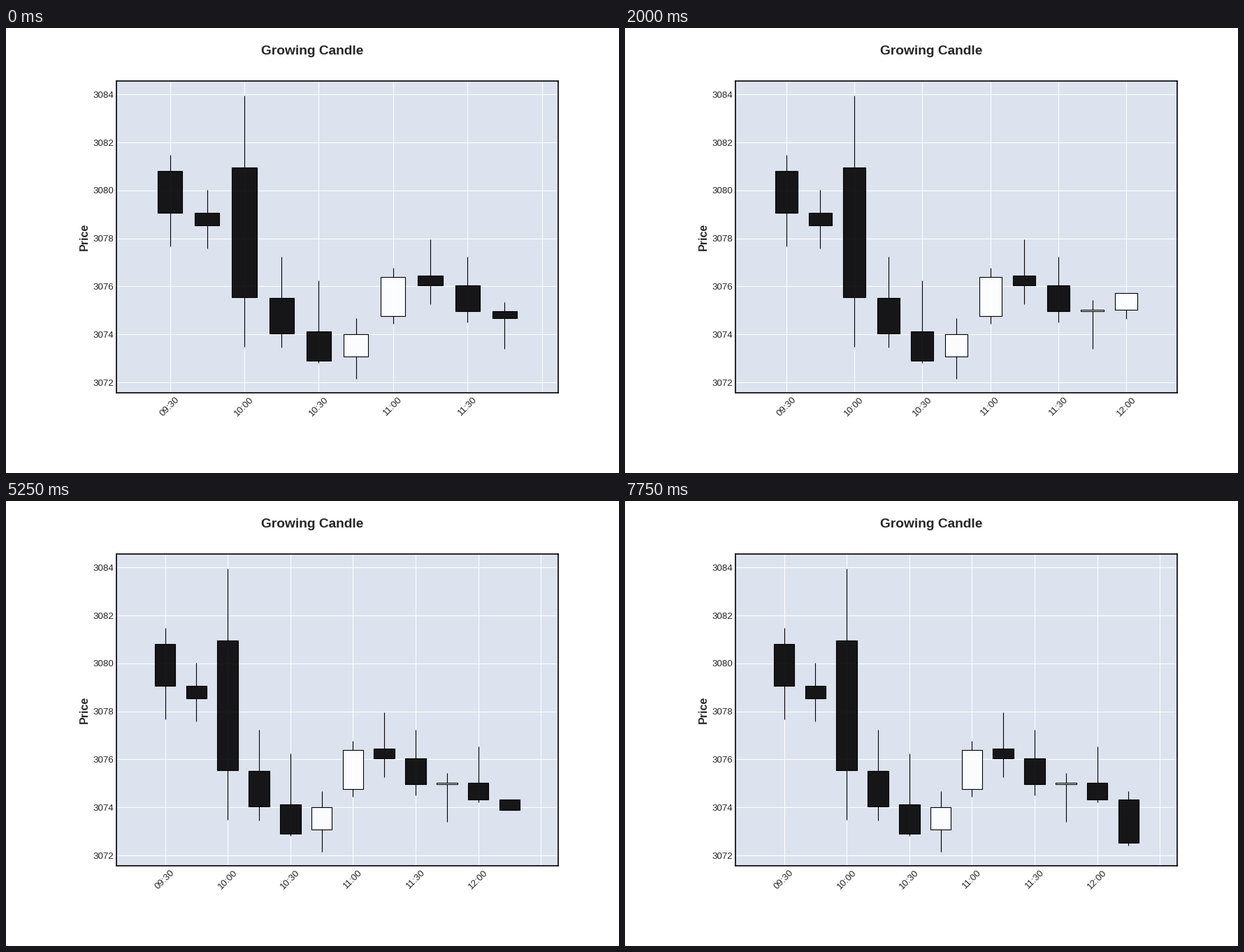
Recreate the animation shown at these times as a matplotlib script. Size 877 by 638 pixels, loop 8 s.

```python
import numpy as np
import matplotlib.pyplot as plt
from matplotlib.animation import FuncAnimation
from matplotlib.collections import LineCollection, PolyCollection

W, H, DPI = 877, 638, 80
FRAMES, INTERVAL = 32, 250
LEFT, RIGHT, TOP, BOTTOM = 158, 790, 76, 523   # plot area in pixels
BASE = 3070          # prices below are offsets from this level
HALF = 0.33          # half a candle body, in slots
PERIOD = 15          # frames one candle keeps growing
FIRST_CLOSE = 4      # frame on which the first growing candle is complete

plt.rcParams.update({
    "font.family": "Liberation Sans", "font.size": 12,
    "text.color": ".15", "axes.labelcolor": ".15",
    "xtick.color": ".15", "ytick.color": ".15",
    "axes.facecolor": "#DCE3EF", "axes.edgecolor": "black",
    "axes.linewidth": 1.5, "axes.axisbelow": True,
    "axes.grid": True, "grid.color": "white", "grid.linewidth": 1,
    "xtick.major.size": 0, "ytick.major.size": 0,
})

# open, high, low, close of the finished quarter hours
HISTORY = [
    (10.81, 11.48, 7.66, 9.07), (9.07, 10.03, 7.58, 8.54),
    (10.95, 13.96, 3.48, 5.56), (5.52, 7.23, 3.45, 4.04),
    (4.11, 6.25, 2.81, 2.90), (3.08, 4.68, 2.15, 4.01),
    (4.76, 6.76, 4.44, 6.38), (6.45, 7.95, 5.27, 6.03),
    (6.03, 7.23, 4.50, 4.97),
]

# turning points of the live price: (frame, price)
TURNS = [
    (-11, 4.97), (-8, 5.33), (-4, 3.40), (0, 4.69), (1.5, 5.42),
    (2, 5.25), (3, 5.25), (4, 5.03), (4.5, 4.66), (8, 5.71),
    (10.5, 6.54), (12, 5.17), (13, 5.84), (14, 5.84), (18.7, 4.21),
    (19, 4.33), (21.7, 3.73), (24.7, 4.68), (25, 4.58), (29, 2.75),
    (30.7, 2.42), (31, 2.51),
]


def candles_at(frame):
    """Finished candles plus those cut from the live price so far."""
    candles = list(HISTORY)
    start = FIRST_CLOSE - PERIOD
    while start < frame:
        end = min(start + PERIOD, frame)
        t = np.linspace(start, end, 10 * (end - start) + 1)
        price = np.interp(t, *zip(*TURNS))
        candles.append((price[0], price.max(), price.min(), price[-1]))
        start += PERIOD
    return candles


def clock(slot):
    minutes = 9 * 60 + 30 + 15 * slot
    return f"{minutes // 60:02d}:{minutes % 60:02d}"


fig = plt.figure(figsize=(W / DPI, H / DPI), dpi=DPI, facecolor="white")
ax = fig.add_axes([LEFT / W, 1 - BOTTOM / H,
                   (RIGHT - LEFT) / W, (BOTTOM - TOP) / H])
fig.suptitle("Growing Candle", x=0.5, y=1 - 34 / H, va="center",
             size="x-large", weight="semibold")
ax.set_ylabel("Price", size="large", weight="semibold")
ax.set_ylim(BASE + 1.565, BASE + 14.56)
ax.set_yticks(range(3072, 3085, 2))
ax.tick_params(axis="x", rotation=45)

wicks = LineCollection([], colors="black", linewidths=1)
bodies = PolyCollection([], edgecolors="black", linewidths=1)
ax.add_collection(wicks)
ax.add_collection(bodies)


def update(frame):
    candles = candles_at(frame)
    n = len(candles)
    lines, boxes, fills = [], [], []
    for x, candle in enumerate(candles):
        start, high, low, close = (BASE + v for v in candle)
        bottom, top = sorted((start, close))
        lines += [[(x, low), (x, bottom)], [(x, top), (x, high)]]
        a, b = x - HALF, x + HALF
        boxes.append([(a, bottom), (a, top), (b, top), (b, bottom)])
        shade = 1 if close > start else 0
        fills.append((shade, shade, shade, 0.9))
    wicks.set_segments(lines)
    bodies.set_verts(boxes)
    bodies.set_facecolor(fills)

    slots = range(0, n + 1, 2)
    ax.set_xticks(slots, [clock(s) if s < n else "" for s in slots])
    mid, span = (n - 1) / 2, 1.115 * n + 0.73
    ax.set_xlim(mid - span / 2, mid + span / 2)
    return wicks, bodies


anim = FuncAnimation(fig, update, frames=FRAMES, interval=INTERVAL,
                     init_func=lambda: update(0), repeat=True,
                     repeat_delay=0, blit=False)
plt.show()
```
